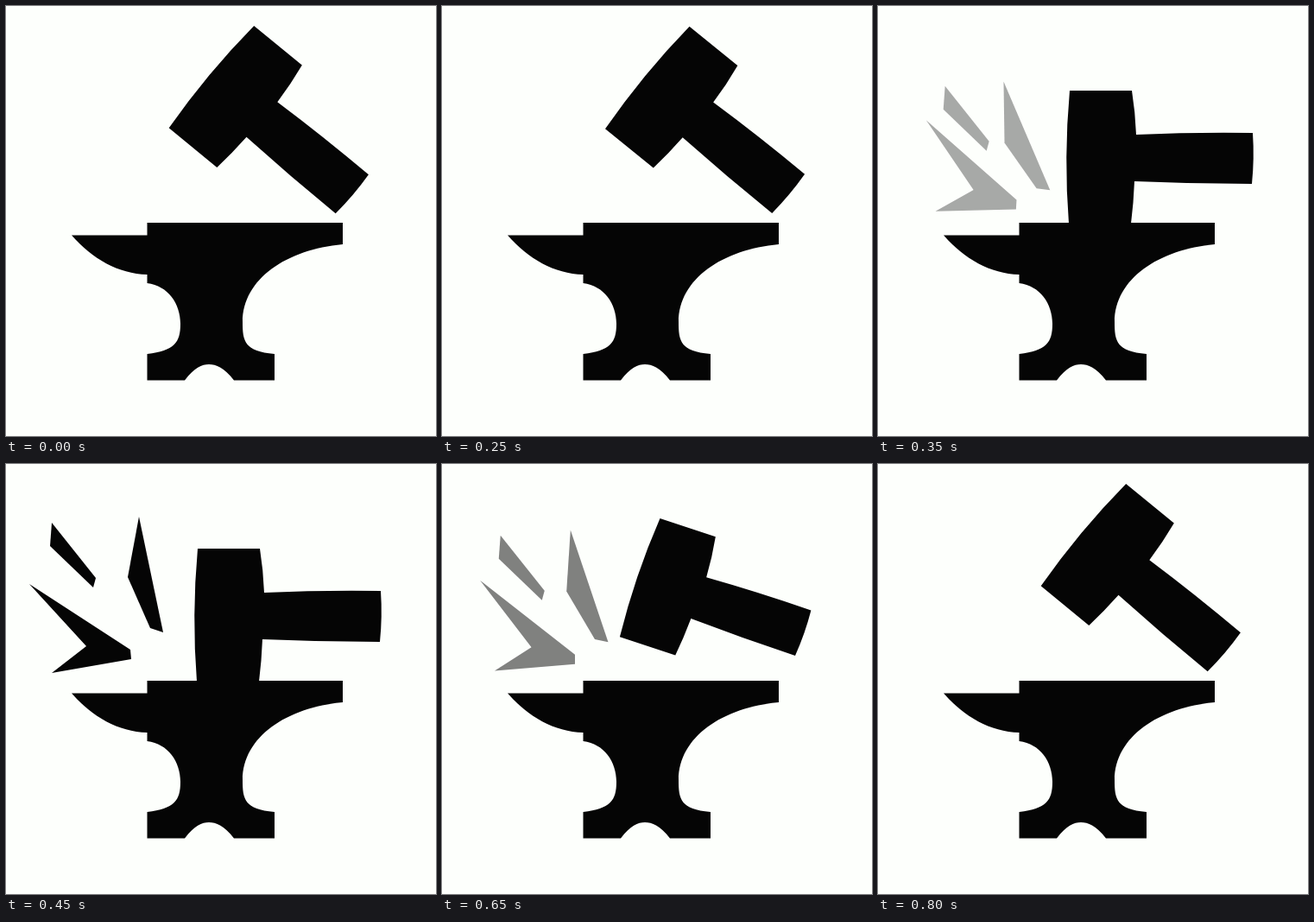
Animation of 498x498 px, one loop 0.85 s. Source, as an HTML page:

```html
<!DOCTYPE html>
<html lang="en">
<head>
<meta charset="utf-8">
<title>Hammer and anvil</title>
<style>
  html, body { margin: 0; width: 100%; height: 100%; overflow: hidden; background: #fdfffc; }
  svg { display: block; width: 498px; height: 498px; fill: #050505; }
</style>
</head>
<body>
<svg viewBox="0 0 498 498">
  <path d="M163.5 251H390V276C325 282 274 316 274 366C274 388 276 400 311 403V433.5H264C253 419 243 415 235 415S218 419 207 433.5H163.5V403C195 399 202 390 202 368C202 345 188 324 163.5 321V311C130 310 100 293 76 265.5H163.5Z"/>
  <path id="hammer" d="M222 98H294Q298 123 299 149Q366 146 434 147Q436 177 433 206Q365 206 297 203Q296 228 293 252H221Q215 175 222 98Z"/>
  <g id="sparks">
    <path d="M53 68L51 95L101 143L104 132Z"/>
    <path d="M154 61L141 131L167 190L182 195Z"/>
    <path d="M27 139L93 211L53 242L145 226L144 215Z"/>
  </g>
</svg>
<script>
const LOOP = 850, STEP = 50;
const PIVOT = { x: 359.5, y: 151.5 }, SWING = 39.4 * Math.PI / 180;

const hammer = document.getElementById('hammer');
const sparks = document.getElementById('sparks');
const [upper, right, lower] = sparks.children;
const start = performance.now();

const ramp = (time, from, to) => Math.min(1, Math.max(0, (time - from) / (to - from)));

// Blends the two poses point by point, so the hammer narrows a little mid-swing
function swingHammer(lift) {
  const a = 1 + lift * (Math.cos(SWING) - 1), b = lift * Math.sin(SWING);
  const { x, y } = PIVOT;
  hammer.setAttribute('transform',
    `matrix(${a} ${b} ${-b} ${a} ${x - a * x + b * y} ${y - b * x - a * y})`);
}

// Slides a spark toward the blow while turning it about its centre
function pullSpark(spark, pull, dx, dy, turn, cx, cy) {
  spark.setAttribute('transform',
    `translate(${dx * pull} ${dy * pull}) rotate(${turn * pull} ${cx} ${cy})`);
}

function draw() {
  const elapsed = (performance.now() - start) % LOOP;
  const time = Math.floor(elapsed / STEP) * STEP;

  swingHammer(1 - ramp(time, 249, 349) + ramp(time, 550, 764));

  const burst = ramp(time, 298, 450), settle = ramp(time, 540, 760);
  const pull = 1.5 * (1 - burst) + 1.18 * settle;
  sparks.setAttribute('opacity', burst - settle);
  pullSpark(upper, pull, 25, 25, 0, 77, 108);
  pullSpark(right, pull, 7, 24, -11.5, 160, 140);
  pullSpark(lower, pull, 19.5, 1.7, 8.5, 90, 200);

  requestAnimationFrame(draw);
}
draw();
</script>
</body>
</html>
```
